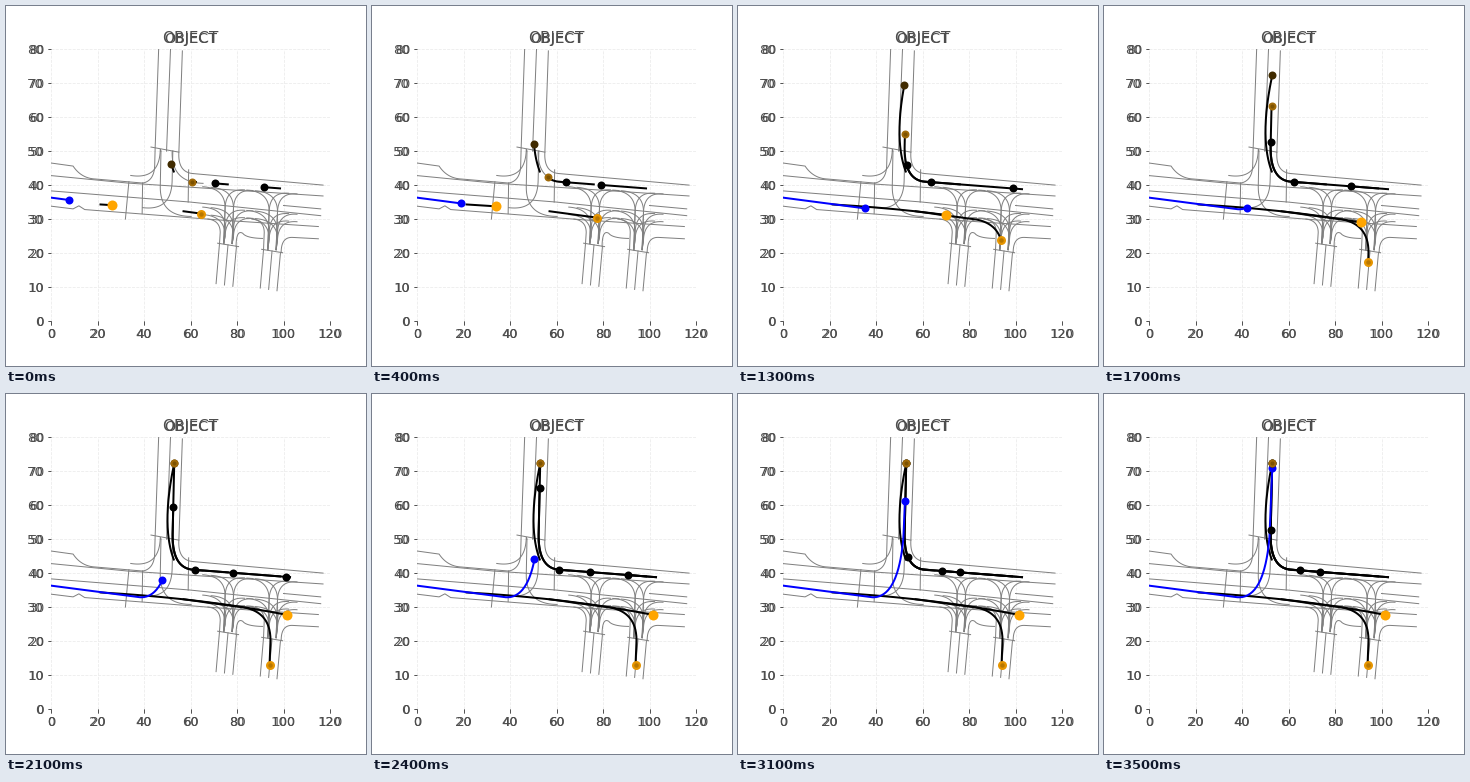
These frames come from a looping animation (360 by 360 pixels, 3.6 s). A matplotlib script:

```python
import numpy as np
import matplotlib.pyplot as plt
from matplotlib.animation import FuncAnimation

FRAMES, STEP = 36, 100
INK, ROAD, GRID = "#4d4d4d", "#808080", "#ebebeb"
CLOCK = np.linspace(-0.5, 3.5, 801)

plt.rcParams.update({"font.family": "DejaVu Sans"})
fig = plt.figure(figsize=(5, 5), dpi=72, facecolor="white")


def chart(label, title):
    """Frameless axes; two stacked ones give the doubled lettering."""
    axes = fig.add_axes([0.125, 0.125, 0.775, 0.755], frameon=False)
    axes.set(xlim=(0, 120), ylim=(0, 80))
    axes.set_title("OBJECT", color=INK, fontsize=title)
    axes.tick_params(color=INK, labelcolor=INK, labelsize=label, length=3.5, width=0.8)
    return axes


chart(13.2, 15.1)
ax = chart(12, 14.4)
ax.set_axisbelow(True)
ax.grid(color=GRID, lw=0.8, ls="--")


def bend(a, b, c):
    """Quadratic curve from a to c, pulled towards b."""
    s = np.linspace(0, 1, 40)[:, None]
    a, b, c = map(np.array, (a, b, c))
    return (1 - s) ** 2 * a + 2 * s * (1 - s) * b + s ** 2 * c


def road(*parts):
    x, y = np.vstack(parts).T
    ax.plot(x, y, color=ROAD, lw=1, zorder=2)


def tilt(level, x):
    """Height at x of a lane that crosses x = 60 at the given level."""
    return level - 0.052 * (x - 60)


# main road
road((0, 46.5), (9.5, 45.6), bend((9.5, 45.6), (13, 42), (19, 41.8)), (39.5, 40.6))
road((0, 42.8), (33, 40.6), (117, 36.8))
road((0, 38.3), (60, 35), (116, 31))
road((0, 33.8), (9.5, 33), (12, 33.9), (14.5, 32.8), (71, 29.8), (115, 27.8))
road((61, 43.4), (117, 40))
road((100, 34), (116, 33))
road((33.5, 41), (32, 30))
road((39.4, 40.6), (39.2, 31.6))
road((59.2, 44.5), (59, 35))

# north road
road((46.3, 80), (44.8, 51), bend((44.6, 46), (44.5, 41.3), (39.5, 40.6)))
road((51.4, 80), (49.7, 50))
road((56.5, 79.5), bend((55, 49.7), (54.5, 43.8), (61, 43.4)))
road((43, 51.2), (55, 49.7))
for x, side, level in [(47.3, -1, 41.5), (47.3, 1, 30.8), (52.4, -1, 32.3), (52.4, 1, 40.8)]:
    end = x + 13 * side
    road((x, 50), bend((x - 0.3, level + 9), (x - 0.6, level), (end, tilt(level, end))))

# south streets: three edge lines, a stop line, and lanes into the main road
for foot, base, mouth in [(71, 11, 22.8), (90, 9.7, 21)]:
    for i in range(3):
        x, y = foot + 3.6 * i, base - 0.4 * i
        road((x, y), (x + 0.125 * (mouth - y), mouth - 0.4 * i))
    left = foot + 0.125 * (mouth - base)
    road((left - 0.8, mouth + 0.1), (left + 8.2, mouth - 0.9))
    for lane in (1.8, 5.4):
        x = left + lane
        for side in (-1, 1):
            for level in (31.6, 33.8, 39.8):
                top, end = tilt(level, x), x + 9 * side
                road((x, mouth), bend((x + 0.6, top - 6), (x + 0.8, top), (end, tilt(level, end))))
    road((left, mouth), bend((left + 0.3, 26), (left + 0.3, 29.6), (left - 5, 30)))
road(bend((79.6, 22), (79.7, 27), (82.5, 25.8)), bend((82.5, 25.8), (84, 24.4), (91, 24.3)))
road(bend((99, 20.2), (99, 24.8), (104, 24.6)), (115, 24.2))

# routes driven by the dots
NORTH = np.vstack([(102.8, 38.8), bend((61, 41), (52.3, 41.5), (52.3, 51)), (53, 72.3)])
LEFT = np.vstack([(-1, 36.4), bend((38, 32.9), (49.5, 32.3), (51.8, 50.5)), (53.2, 74)])
SOUTH = np.vstack([(57, 32.3), bend((82, 30), (94.6, 28.8), (94.4, 20)), (94, 13)])
EAST = bend((21.3, 34.3), (65, 32.6), (101.5, 27.7))
UP = bend((52.8, 44), (47.3, 54), (53, 72.3))


class Car:
    """Follows a route from time `birth`; speed is linear between (time, speed) pairs."""

    def __init__(self, route, birth, speeds, start=0, line="black", dot="black",
                 size=8, core=None, z=5):
        self.route, self.birth, self.start = route, birth, start
        self.miles = np.r_[0, np.cumsum(np.hypot(*np.diff(route, axis=0).T))]
        v = np.interp(CLOCK, *zip(*speeds))
        self.run = np.cumsum(v) * (CLOCK[1] - CLOCK[0])
        self.trail, = ax.plot([], [], color=line, lw=2, zorder=3 + (line != "black"))
        looks = [(dot, size)] + ([(core, size / 2)] if core else [])
        self.dots = [ax.plot([], [], "o", color=c, ms=s, mew=0, zorder=z)[0]
                     for c, s in looks]

    def show(self, now):
        seen = now >= self.birth
        begin, here = np.interp([self.birth, now], CLOCK, self.run)
        end = min(self.start + here - begin, self.miles[-1])
        s = np.linspace(self.start, end, 150)
        x, y = (np.interp(s, self.miles, axis) for axis in self.route.T)
        self.trail.set_data(x, y)
        for dot in self.dots:
            dot.set_data(x[-1:], y[-1:])
        for part in (self.trail, *self.dots):
            part.set_visible(seen)


cars = [
    Car(LEFT, -0.27, [(0, 33), (0.6, 17.5), (1.8, 17.5), (2.5, 25), (3.5, 24.3)],
        line="blue", dot="blue"),
    Car(EAST, -0.4, [(0, 12.3), (1.3, 55), (2, 48)], dot="orange", size=10),
    Car(SOUTH, -0.2, [(0, 37), (1.1, 15), (1.9, 18)],
        dot="#e69500", size=9, core="#b87700"),
    Car(NORTH, -0.3, [(-0.3, 19.5), (0.6, 12.8), (1.1, 16), (2.8, 19)], start=26.8),
    Car(NORTH, -0.2, [(0, 35), (1.62, 1), (2.1, 1), (3.5, 24.4)], start=4.3),
    Car(NORTH, 1.18, [(1.3, 34), (2.5, 8.4)]),
    Car(NORTH, 2.06, [(2.1, 40), (3.2, 7)]),
    Car(UP, -0.2, [(-0.3, 11.5), (2, 27.5)], dot="#402b00", z=6),
    Car(NORTH, -0.2, [(0, 9.6), (2.1, 24.7)], start=40.5,
        dot="#a06a08", core="#7d5200", z=7),
]


def update(n):
    for car in cars:
        car.show(n * STEP / 1000)
    return []


anim = FuncAnimation(fig, update, frames=FRAMES, interval=STEP,
                     init_func=lambda: update(0), repeat=True, repeat_delay=0)
plt.show()
```
